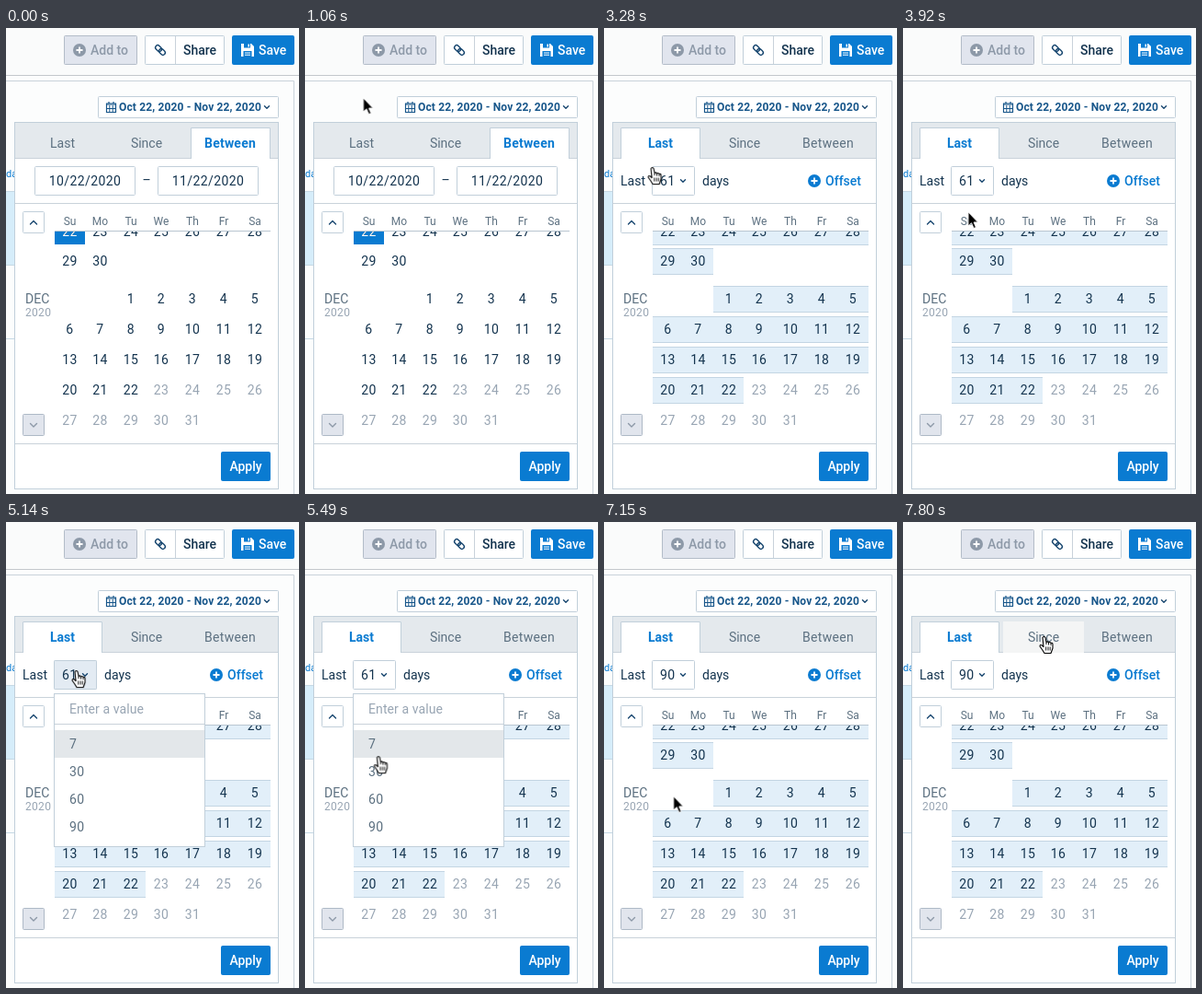
An HTML page that plays this animation: 319x506 px, repeating every 8000 ms.

```html
<!DOCTYPE html>
<html lang="en">
<head>
<meta charset="utf-8">
<title>Date range picker</title>
<style>
html, body { margin: 0; width: 100%; height: 100%; overflow: hidden; background: #fcfdfd; }
svg { display: block; width: 319px; height: 506px; }
text { font: 14px Roboto, "Noto Sans", sans-serif; fill: #14344f; }
.mid { text-anchor: middle; }
.med { font-weight: 500; }
.bold { font-weight: 600; }
.digits { letter-spacing: .4px; }
.gray, .off { fill: #5c7080; }
.pale { fill: #98a5b3; }
.blue { fill: #0a7bd1; }
.white { fill: #fff; }
.box { fill: #fff; stroke: #c1cfda; }
.line { fill: none; stroke: #c9d2da; }
.icon { fill: none; stroke: #17466f; stroke-width: 1.4; stroke-linecap: round; stroke-linejoin: round; }

/* 1% = 80 ms */
.cursor, .anim { animation: 8s linear infinite; }
.cursor { animation-name: move; }
.between, .last, .hand, .arrow, .old, .new, .press, .pick { animation-timing-function: step-end; }
.between { animation-name: between; }
.last { animation-name: last; }
.old { animation-name: old; }
.new { animation-name: new; }
.hand { animation-name: hand; }
.arrow { animation-name: arrow; }
.press { animation-name: press; }
.pick { animation-name: pick; }
.menu { animation-name: menu; }
.hoverLast { animation-name: hoverLast; }
.hoverSince { animation-name: hoverSince; }

@keyframes move {
  0%, 6% { transform: translate(299px, 46px); }
  7.8% { transform: translate(190px, 4px); }
  9.625%, 11.2% { transform: translate(78px, 4px); }
  14.75%, 40.3% { transform: translate(53px, 128px); }
  41% { transform: translate(54px, 150px); }
  41.75% { transform: translate(2px, 215px); }
  42.4% { transform: translate(12px, 285px); }
  43.1% { transform: translate(58px, 318px); }
  43.875%, 46.4% { transform: translate(73px, 324px); }
  47.6% { transform: translate(56px, 265px); }
  49% { transform: translate(71px, 200px); }
  52.5% { transform: translate(77px, 159px); }
  63.5% { transform: translate(77px, 159px); animation-timing-function: ease-in-out; }
  73%, 88.8% { transform: translate(83px, 326px); }
  90.8% { transform: translate(58px, 230px); }
  92% { transform: translate(105px, 168px); }
  93.125%, 94.8% { transform: translate(157px, 141px); }
  97.5%, 100% { transform: translate(154px, 124px); }
}
@keyframes between { 0% { opacity: 1; } 31.375%, 100% { opacity: 0; } }
@keyframes last { 0% { opacity: 0; } 31.375%, 100% { opacity: 1; } }
@keyframes old { 0% { opacity: 1; } 79%, 100% { opacity: 0; } }
@keyframes new { 0% { opacity: 0; } 79%, 100% { opacity: 1; } }
@keyframes hand {
  0%, 41.6%, 79% { opacity: 0; }
  26.25%, 55.5%, 96.5%, 100% { opacity: 1; }
}
@keyframes arrow {
  0%, 26.25%, 55.5%, 96.5%, 100% { opacity: 0; }
  6%, 41.6%, 79% { opacity: 1; }
}
@keyframes press { 0%, 66%, 100% { opacity: 0; } 55.5% { opacity: 1; } }
@keyframes pick {
  0% { transform: none; }
  68.7% { transform: translateY(30px); }
  69.75% { transform: translateY(60px); }
  71.25%, 100% { transform: translateY(90px); }
}
@keyframes menu {
  0%, 55.4% { opacity: 0; }
  58.25%, 78.99% { opacity: 1; }
  79%, 100% { opacity: 0; }
}
@keyframes hoverLast { 0%, 26% { opacity: 0; } 27.75%, 100% { opacity: 1; } }
@keyframes hoverSince { 0%, 95.5% { opacity: 0; } 97.5%, 100% { opacity: 1; } }
</style>
</head>
<body>
<svg viewBox="0 0 319 506">
  <defs>
    <clipPath id="days"><rect x="50" y="221" width="240" height="228"/></clipPath>
    <g id="plus"><circle r="7"/><path d="M-3.5 0H3.5M0-3.5V3.5" stroke="#fff" stroke-width="1.8"/></g>
    <path id="down" class="icon" d="M-2.5-1.2L0 1.2L2.5-1.2"/>
  </defs>

  <!-- toolbar -->
  <rect width="319" height="51" fill="#fafbfb"/>
  <path d="M0 51.5H319" stroke="#c3c8cc"/>
  <rect x="63.5" y="8.5" width="79" height="31" rx="1" fill="#e1e5ee" stroke="#b3bcc8"/>
  <use href="#plus" x="80" y="24" fill="#8d99a8"/>
  <text x="92" y="29" class="med" style="fill:#8d99a8">Add to</text>
  <rect x="151.5" y="8.5" width="86" height="31" rx="1" class="box"/>
  <path d="M184.5 9V39" class="line"/>
  <g class="icon" transform="translate(168 24) rotate(45)" stroke-width="1.6">
    <rect x="-6.5" y="-2.5" width="7.5" height="5" rx="2.5"/>
    <rect x="-1" y="-2.5" width="7.5" height="5" rx="2.5"/>
  </g>
  <text x="193" y="29" class="med">Share</text>
  <rect x="246" y="8" width="68" height="32" rx="2" class="blue"/>
  <path class="white" d="M256 17H267L270 20V31H256Z"/>
  <path class="blue" d="M259 17H266V21.5H259ZM258.5 25H267.5V31H258.5Z"/>
  <path class="white" d="M263.5 17.5H265V20.5H263.5ZM260 26.5H266V27.5H260ZM260 28.8H266V29.8H260Z"/>
  <text x="275" y="29" class="med white">Save</text>

  <!-- page behind -->
  <path d="M0 57.5H313.5V506" class="line"/>
  <text x="0" y="162" class="blue" style="font-size:11px">da</text>
  <rect y="177" width="10" height="81" fill="#d6edfa"/>
  <path d="M0 177.5H10M0 257.5H10M0 337.5H10" stroke="#c5d8e4"/>

  <!-- range button -->
  <rect x="100.5" y="74.5" width="196" height="23" rx="1" class="box"/>
  <path d="M109.5 82H119.5V91.5H109.5ZM112 80V82M117 80V82" fill="#fff" stroke="#17568a" stroke-width="1.2"/>
  <path d="M109.5 83H119.5M112.8 84V91M116.2 84V91M110 87.5H119" stroke="#17568a"/>
  <text x="123" y="90" class="bold" style="font-size:12px;letter-spacing:.15px;fill:#17568a">Oct 22, 2020 - Nov 22, 2020</text>
  <use href="#down" x="284" y="86"/>

  <!-- panel -->
  <rect x="9.5" y="102.5" width="287" height="398" class="box"/>
  <rect x="10" y="103" width="286" height="39" fill="#e4e9ed"/>
  <path d="M10 141.5H296M10 190.5H296M10 451.5H296" class="line"/>
  <rect x="18" y="108" width="87" height="34" fill="#fafafa" class="anim hoverLast"/>
  <rect x="109" y="108" width="88" height="34" fill="#f4f5f5" class="anim hoverSince"/>
  <text x="153" y="130" class="mid off">Since</text>

  <g class="anim between">
    <path d="M201.5 142V108.5H287.5V142" class="box"/>
    <text x="61.5" y="130" class="mid off">Last</text>
    <text x="244" y="130" class="mid bold blue" style="letter-spacing:.2px">Between</text>
    <rect x="31.5" y="150.5" width="109" height="31" rx="1" class="box"/>
    <rect x="165.5" y="150.5" width="109" height="31" rx="1" class="box"/>
    <text x="86" y="171" class="mid digits">10/22/2020</text>
    <text x="153" y="170" class="mid">–</text>
    <text x="220" y="171" class="mid digits">11/22/2020</text>
    <rect x="53" y="221" width="33" height="14" class="blue"/>
  </g>

  <g class="anim last">
    <path d="M18.5 142V108.5H104.5V142" class="box"/>
    <text x="61.5" y="130" class="mid bold blue">Last</text>
    <text x="244" y="130" class="mid off" style="letter-spacing:.3px">Between</text>
    <text x="18" y="171">Last</text>
    <rect x="52.5" y="150.5" width="46" height="31" rx="1" class="box"/>
    <rect x="52.5" y="150.5" width="46" height="31" rx="1" fill="#e3ebf3" stroke="#c1cfda" class="anim press"/>
    <text x="61" y="171" class="digits anim old">61</text>
    <text x="61" y="171" class="digits anim new">90</text>
    <use href="#down" x="86" y="166"/>
    <text x="107" y="171">days</text>
    <use href="#plus" x="229" y="166" class="blue"/>
    <text x="241" y="171" class="med blue">Offset</text>
    <g id="range" clip-path="url(#days)"></g>
  </g>

  <!-- calendar -->
  <g id="heads"></g>
  <g id="cells" clip-path="url(#days)"></g>
  <text x="69.5" y="226" class="mid digits white anim between" clip-path="url(#days)">22</text>
  <path d="M53 220.5H288" stroke="#b9c6d1"/>
  <rect x="18.5" y="199.5" width="23" height="23" rx="1" class="box"/>
  <path d="M26.5 213L30 209.5L33.5 213" class="icon"/>
  <rect x="18.5" y="419.5" width="23" height="23" rx="1" fill="#e1e5ed" stroke="#aeb9c6"/>
  <path d="M26.5 429.5L30 433L33.5 429.5" class="icon" style="stroke:#8d99a8"/>
  <text x="21" y="299" class="gray">DEC</text>
  <text x="21" y="313" class="pale" style="font-size:12px;letter-spacing:.3px">2020</text>
  <rect x="234" y="460" width="54" height="32" rx="2" class="blue"/>
  <text x="261" y="481" class="mid med white">Apply</text>

  <!-- value menu -->
  <g class="anim menu">
    <rect x="52.5" y="186.5" width="164" height="166" class="box"/>
    <text x="69" y="208" class="pale" style="letter-spacing:.1px">Enter a value</text>
    <path d="M53 219.5H216" class="line"/>
    <rect x="53" y="226" width="163" height="30" fill="#e3e7ea" class="anim pick"/>
    <g id="options"></g>
  </g>

  <g class="cursor">
    <path class="anim arrow" d="M0 0V15L3.5 11.8L6 17.5L8.4 16.5L6 11H10.5Z" fill="#000" stroke="#fff" stroke-width=".9"/>
    <g class="anim hand" stroke="#000" stroke-width="1.1" stroke-linejoin="round">
      <path fill="#fff" d="M-2 1.5Q-.5-.5 1 1.5L2 6.5Q3.5 5 4.5 7Q6 5.8 7 7.5Q9 6.8 9 9V13Q8 16 7 18.5H0Q-2 15-5 11Q-5 8.5-2.5 10L-1 11.5Z"/>
      <path d="M1.7 11.5V15.5M4 11.5V15.5M6.2 11.5V15.5M2 6.5V9M4.5 7V9.5M7 7.5V10" fill="none" stroke-width=".9"/>
    </g>
  </g>
</svg>
<script>
const NS = "http://www.w3.org/2000/svg";
const columns = [69.5, 102.5, 136, 169, 203, 237, 271];
const edges = [53, 86, 119, 152, 186, 220, 254, 288];

function add(parent, tag, attrs, text = "") {
  const el = document.createElementNS(NS, tag);
  for (const name in attrs) el.setAttribute(name, attrs[name]);
  el.textContent = text;
  document.getElementById(parent).append(el);
}

"Su Mo Tu We Th Fr Sa".split(" ").forEach((name, i) =>
  add("heads", "text", { x: columns[i], y: 214, class: "mid gray", style: "font-size:12px" }, name));

// Each week: row centre, first column, first day, last day
const weeks = [
  [221, 0, 22, 28], [253, 0, 29, 30],
  [294, 2, 1, 5], [327, 0, 6, 12], [360, 0, 13, 19], [393, 0, 20, 26], [426, 0, 27, 31]
];
weeks.forEach(([y, col, from, to], week) => {
  const past = day => week > 4 && day > 22;
  for (let day = from; day <= to; day++) {
    add("cells", "text", {
      x: columns[col + day - from], y: y + 5,
      class: "mid digits" + (past(day) ? " pale" : "")
    }, day);
  }
  const end = week > 4 ? Math.min(to, 22) : to;
  if (end < from) return;
  const left = edges[col], right = edges[col + end - from + 1];
  add("range", "rect", { x: left, y: y - 14, width: right - left, height: 29, fill: "#e2eff9" });
  add("range", "path", { d: `M${left} ${y - 13.5}H${right}m0 28H${left}`, fill: "none", stroke: "#c3d5e3" });
});

[7, 30, 60, 90].forEach((value, i) =>
  add("options", "text", { x: 69, y: 246 + i * 30, class: "digits gray" }, value));
</script>
</body>
</html>
```
